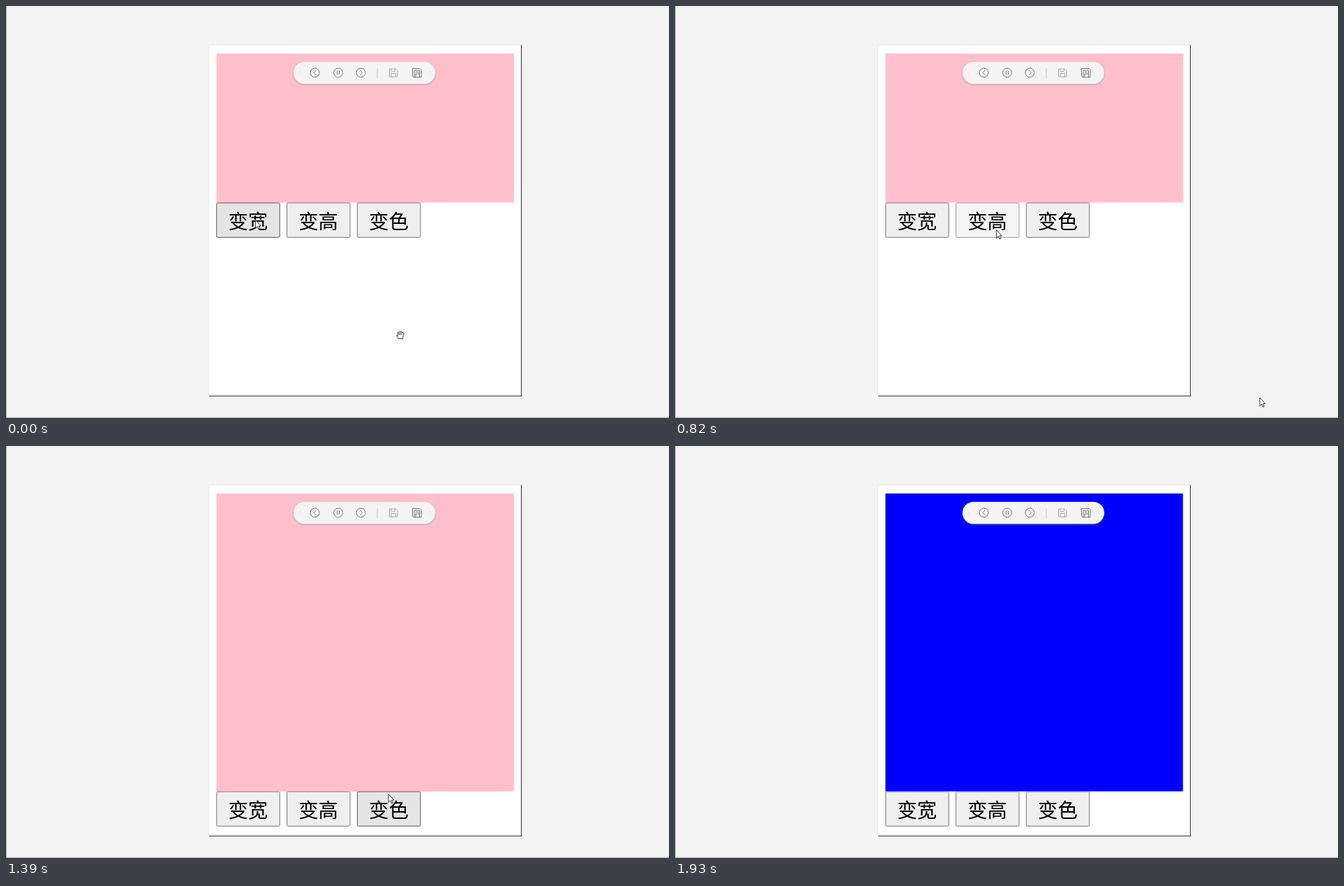
These frames come from a looping animation (950 px wide and 590 px high, 2.58 s). An HTML page:

```html
<!DOCTYPE html>
<html lang="zh">
<head>
<meta charset="utf-8">
<style>
html, body { margin: 0; width: 100%; height: 100%; overflow: hidden; background: #f3f3f3; }
svg { display: block; width: 950px; height: 590px; }
text { font: 28.4px "Noto Sans CJK SC", "Noto Sans CJK", sans-serif; }
.icon { fill: none; stroke: #777; stroke-width: 1; }
</style>
</head>
<body>
<svg viewBox="0 0 950 590">
  <defs>
    <path id="arrow" d="M.5 .5V12.3L3.2 9.7L5.1 13.8L6.9 13L5.1 9H8.3Z" fill="#fff" stroke="#222" stroke-width=".9"/>
    <path id="disk" d="M.5 .5H9.5L12 3V12H.5ZM3 .5V4H8.5V.5M3 12V7H9.5V12"/>
    <filter id="shadow" x="-10%" y="-40%" width="120%" height="180%">
      <feDropShadow dx="0" dy="1" stdDeviation="1.6" flood-color="#777" flood-opacity=".55"/>
    </filter>
  </defs>
  <rect width="950" height="590" fill="#f3f3f3"/>
  <path d="M.5 0V590M0 589.5H950" stroke="#a5a5a5"/>
  <rect x="290" y="55" width="450" height="505" fill="#e9e9e9"/>
  <rect x="291" y="56.5" width="449" height="503" fill="#fff"/>
  <path d="M291 558.5H739.5M738.5 56V559" stroke="#333" stroke-width="1.1"/>
  <rect id="box" x="301.5" y="68" width="426.3"/>
  <g id="buttons"></g>
  <rect x="412" y="80" width="203" height="31.5" rx="15.75" fill="#f4f4f4" filter="url(#shadow)"/>
  <g class="icon">
    <circle cx="442.5" cy="95.5" r="6.5"/>
    <circle cx="476" cy="95.5" r="6.5"/>
    <circle cx="508.5" cy="95.5" r="6.5"/>
    <path d="M444 92.5L441 95.5L444 98.5M474.5 93V98M477.5 93V98M507.5 92.5L510.5 95.5L507.5 98.5"/>
    <path d="M532 89.5V103" stroke="#c4c4c4"/>
    <path d="M421 93V98M608 93V98" stroke="#dcdcdc" stroke-dasharray="1 1"/>
    <use href="#disk" x="549" y="89.5" stroke="#aaa"/>
    <path d="M582.5 89.5H593L595 91.5V102H584L582.5 100.5ZM585 102V92H592.5V102M587 102V97H592.5M587 94.5H591"/>
  </g>
  <g id="hand" transform="translate(559 465)">
    <path d="M3.5 11.5L.8 7.2Q.6 5.6 2.8 7L2.2 3Q2.6 1.4 3.8 2.7L4.3 1.6Q5.3 .4 6 1.7Q7.3 .4 8 2.2Q9.5 1.4 9.7 3.3Q11.4 3 11 5.2L9.8 8.9L9.5 11.5Z" fill="#fff" stroke="#222" stroke-width=".9"/>
    <path d="M4 3L4.7 6M6 2.2L6.2 5.7M8 2.8L7.9 5.9" stroke="#222" stroke-width=".8"/>
  </g>
  <use id="inner" href="#arrow"/>
  <use id="outer" href="#arrow"/>
</svg>
<script>
const LOOP = 2580;
const $ = id => document.getElementById(id);
const styles = {
  idle: ['#efefef', '#767676'],
  hover: ['#e5e5e6', '#555'],
  active: ['#f5f5f5', '#999']
};

// Each step changes only the properties it lists; "focus" is the button under the pointer.
const steps = [
  { at: 0, tall: false, color: '#ffc0cb', focus: 0, mode: 'hover', inner: [357, 306], hand: true, outer: null },
  { at: 120, focus: 1, inner: [460, 318] },
  { at: 270, inner: [460, 320.5] },
  { at: 420, inner: [460, 320] },
  { at: 700, mode: 'active' },
  { at: 820, hand: false, outer: [837.5, 560.5] },
  { at: 970, tall: true, focus: -1, inner: [476, 316], outer: [910.5, 583] },
  { at: 1120, inner: [536.5, 335] },
  { at: 1240, inner: [548, 469] },
  { at: 1390, focus: 2, mode: 'hover', inner: [547.5, 498], outer: null },
  { at: 1510, inner: [547, 513] },
  { at: 1660, mode: 'active' },
  { at: 1780, color: '#00f', mode: 'hover' },
  { at: 1930, focus: -1, inner: null }
];

const buttons = ['变宽', '变高', '变色'].map((label, i) => {
  const x = 301.5 + i * 100.8;
  $('buttons').insertAdjacentHTML('beforeend',
    `<g><rect x="${x + .3}" y="282" width="90.4" height="49.3" rx="1.5"/>
     <text x="${x + 45.3}" y="318.7" text-anchor="middle">${label}</text></g>`);
  return $('buttons').lastElementChild.querySelector('rect');
});

function show(node, visible) {
  node.setAttribute('visibility', visible ? 'visible' : 'hidden');
}

function placePointer(node, point) {
  show(node, point);
  if (point) node.setAttribute('transform', `translate(${point})`);
}

function draw(time) {
  const state = Object.assign({}, ...steps.filter(step => step.at <= time));
  $('box').setAttribute('height', state.tall ? 426.5 : 213.5);
  $('box').setAttribute('fill', state.color);
  $('buttons').setAttribute('transform', `translate(0 ${state.tall ? 213 : 0})`);
  buttons.forEach((rect, i) => {
    const [fill, stroke] = styles[i === state.focus ? state.mode : 'idle'];
    rect.setAttribute('fill', fill);
    rect.setAttribute('stroke', stroke);
  });
  show($('hand'), state.hand);
  placePointer($('inner'), state.inner);
  placePointer($('outer'), state.outer);
}

const start = performance.now();
function tick() {
  draw((performance.now() - start) % LOOP);
  requestAnimationFrame(tick);
}
tick();
</script>
</body>
</html>
```
